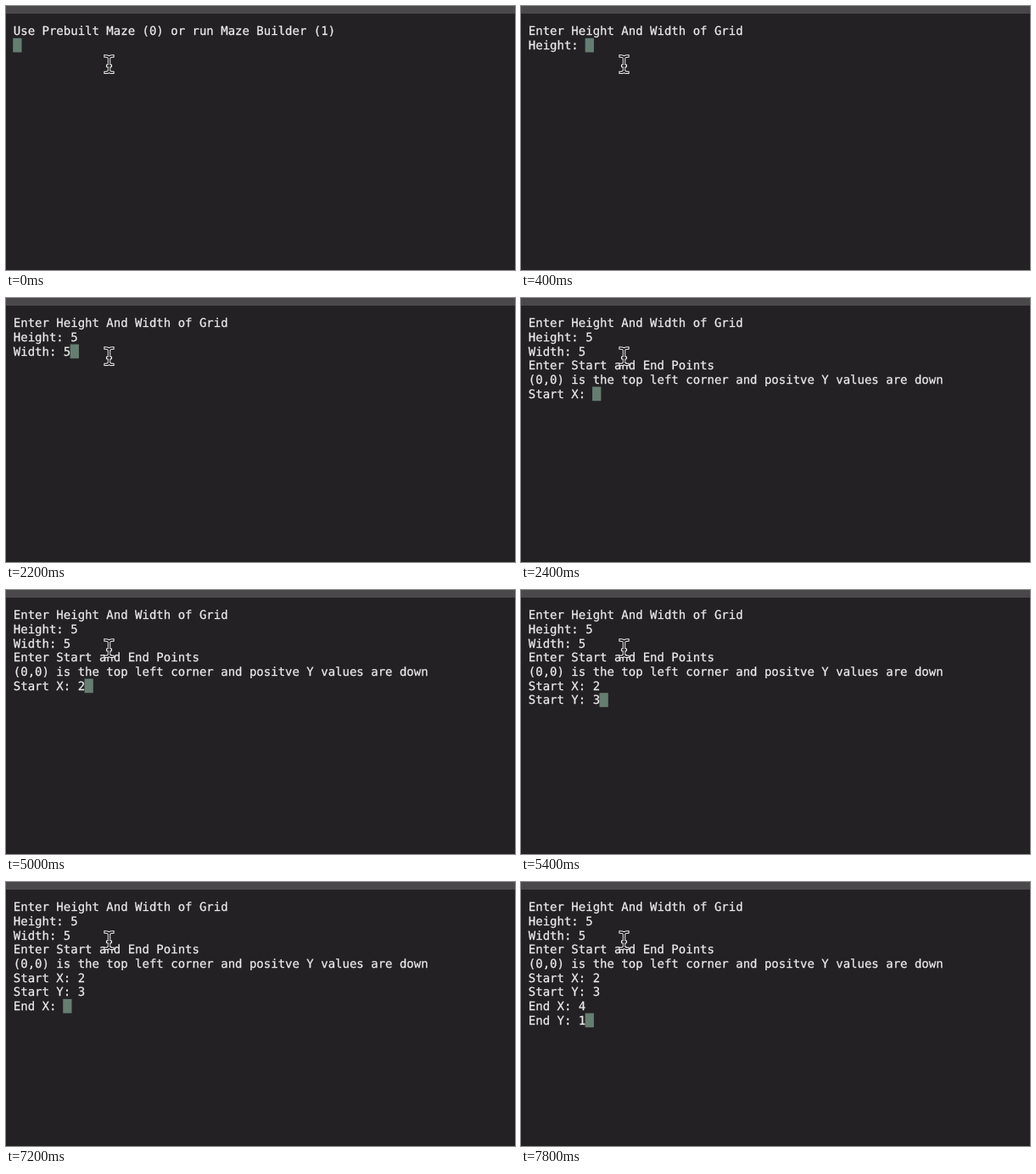
Recreate the animation shown at these times as an HTML page with a canvas. Size 600 px wide and 311 px high, loop 8000 ms.

```html
<!DOCTYPE html>
<html lang="en">
<head>
<meta charset="utf-8">
<title>Maze setup in a terminal</title>
<style>
  html, body { margin: 0; width: 100%; height: 100%; overflow: hidden; background: #232123; }
  canvas { display: block; width: 600px; height: 311px; }
</style>
</head>
<body>
<canvas id="stage" width="600" height="311"></canvas>
<script>
const ctx = document.getElementById('stage').getContext('2d');
const LOOP = 8000;
const LEFT = 8.8, TOP = 21.2, BASE = 13.2;
const CELL = 8.428, ROW = 16.67;

// Each step: start time, text it prints ('\f' clears the screen first).
const steps = [
  [0, '\fUse Prebuilt Maze (0) or run Maze Builder (1)\n'],
  [200, '1'],
  [400, '\fEnter Height And Width of Grid\nHeight: '],
  [1800, '5'],
  [2000, '\nWidth: '],
  [2200, '5'],
  [2400, '\nEnter Start and End Points\n' +
         '(0,0) is the top left corner and positve Y values are down\nStart X: '],
  [5000, '2'],
  [5200, '\nStart Y: '],
  [5400, '3'],
  [5800, '\nEnd X: '],
  [7400, '4'],
  [7600, '\nEnd Y: '],
  [7800, '1']
];

function screenAt(t) {
  const printed = steps.filter(([start]) => start <= t).map(([, text]) => text).join('');
  return printed.slice(printed.lastIndexOf('\f') + 1).split('\n');
}

function drawText(lines) {
  ctx.font = '14px "DejaVu Sans Mono", monospace';
  ctx.textRendering = 'geometricPrecision';
  ctx.textBaseline = 'alphabetic';
  ctx.fillStyle = ctx.strokeStyle = '#ececec';
  ctx.lineWidth = 0.25;
  lines.forEach((line, row) => {
    const y = TOP + BASE + row * ROW;
    [...line].forEach((ch, col) => {
      const x = LEFT + col * CELL;
      ctx.fillText(ch, x, y);
      ctx.strokeText(ch, x, Math.round(y));
    });
  });
}

function drawCaret(lines) {
  const row = lines.length - 1;
  ctx.fillStyle = '#667d72';
  ctx.fillRect(LEFT - 0.6 + lines[row].length * CELL, TOP + row * ROW, 10.3, ROW);
}

function drawPointer(x, y) {
  const beam = new Path2D();
  for (const s of [-1, 1]) {
    for (const side of [-1, 1]) {
      beam.moveTo(x + side * 4.4, y + s * 9.7);
      beam.quadraticCurveTo(x, y + s * 9.7, x, y + s * 7.2);
    }
  }
  beam.moveTo(x, y - 7.2);
  beam.lineTo(x, y + 7.2);
  beam.moveTo(x - 1.8, y + 1.8);
  beam.lineTo(x + 1.8, y + 1.8);
  ctx.lineCap = 'square';
  ctx.lineJoin = 'round';
  for (const [color, width] of [['#f6f6f6', 3.4], ['#0c0c0c', 1.4]]) {
    ctx.strokeStyle = color;
    ctx.lineWidth = width;
    ctx.stroke(beam);
  }
}

function draw(now) {
  const lines = screenAt(now % LOOP);
  ctx.fillStyle = '#232123';
  ctx.fillRect(0, 0, 600, 311);
  ctx.fillStyle = '#4a484a';
  ctx.fillRect(0, 0, 600, 9);
  drawCaret(lines);
  drawText(lines);
  drawPointer(121.5, 68.7);
}

const begin = performance.now();
function frame() {
  draw(performance.now() - begin);
  requestAnimationFrame(frame);
}
frame();
</script>
</body>
</html>
```
